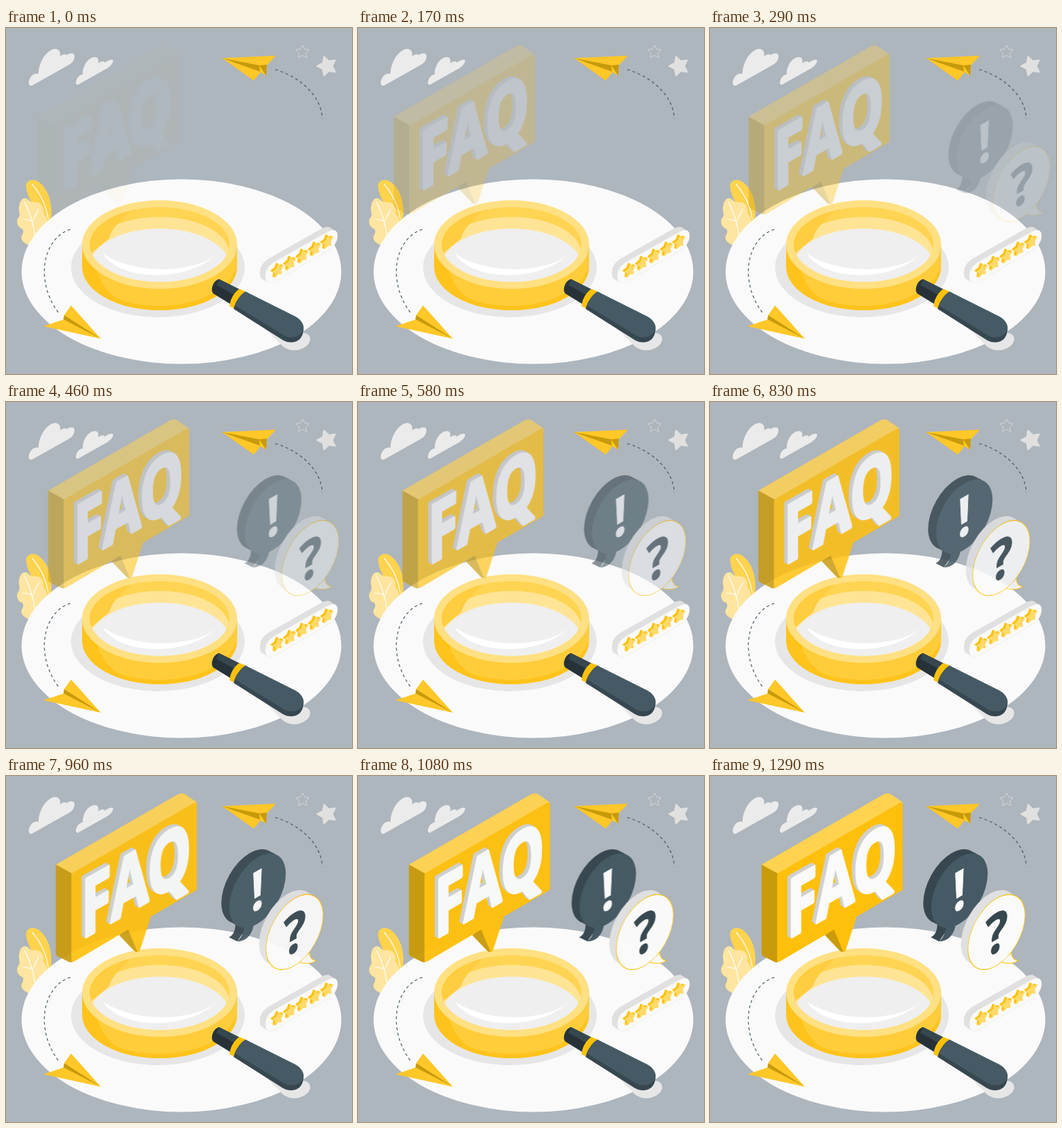
An HTML page that plays this animation: 500x500 px, repeating every 1330 ms.

```html
<!DOCTYPE html>
<html lang="en">
<head>
<meta charset="utf-8">
<title>FAQ</title>
<style>
  html, body { margin: 0; width: 100%; height: 100%; overflow: hidden; background: #adb5bd; }
  svg { display: block; width: 100%; height: 100%; }
  text { font-family: "Open Sans", "Noto Sans", sans-serif; font-weight: 700; stroke-linejoin: round; }
  .dash { fill: none; stroke: #455a64; stroke-width: 1.2; stroke-dasharray: 4 4; }
  .vein { fill: none; stroke: #fff; stroke-width: 1.2; stroke-linecap: round; }
</style>
</head>
<body>
<svg viewBox="0 0 500 500">
  <defs>
    <clipPath id="hole"><ellipse cx="222" cy="313" rx="101" ry="54"/></clipPath>
    <path id="pill" d="M375 358C375 349 380 343 388 338L462 296C472 290 479 291 479 300C479 309 473 317 466 321L391 365C381 371 374 369 375 358Z"/>
    <circle id="round" r="48" transform="matrix(.85 -.5 0 1 0 0)"/>
    <text id="word" transform="matrix(.68 -.39 0 1 116 233.5)" font-size="116" stroke-width="5" x="-7 56 134">FAQ</text>
    <g id="ask">
      <use href="#round" x="414" y="225.5"/>
      <path d="M435 256C436 263 439 266 444 267C438 271 430 271 422 269Z"/>
    </g>
  </defs>

  <g fill="#ebebeb">
    <path d="M38 83C33 85 31 79 35 72C38 67 42 65 47 66C47 54 54 37 67 31C75 28 80 34 78 41C82 38 86 37 88 39C92 36 99 35 99 41C99 49 92 53 86 56Z"/>
    <path d="M104 82C99 82 101 75 104 71C107 68 109 67 111 67C110 58 116 46 124 43C132 40 135 45 133 51C137 48 141 47 143 50C148 46 155 44 155 48C153 54 147 58 143 60Z"/>
  </g>
  <g id="sky"></g>

  <path fill="#ffc727" d="M312 43.5L390 40L377 54L376 69L368 64L358 76Z"/>
  <path fill="#c79a0a" d="M312 43.5L366 54L367 63ZM366 54L377 53L376 69Z"/>
  <path class="dash" d="M389 60C424 70 456 98 457 131"/>

  <path fill="#ffd34d" d="M29 228C30 219 40 217 48 223C62 234 68 255 65 278L58 282C50 270 30 250 29 228Z"/>
  <path class="vein" d="M38 226C50 240 58 256 61 276"/>
  <path fill="#ffe5a0" d="M19 258C20 246 28 243 33 249C38 254 40 250 46 252C54 255 55 262 54 268C58 272 60 278 62 290L40 318C30 312 22 310 22 302C24 297 27 293 23 290C16 288 14 278 18 274C22 270 17 262 19 258Z"/>
  <path class="vein" d="M27 252C34 266 40 282 42 302M25 276L40 279M47 262L40 276"/>

  <ellipse cx="253.5" cy="352" rx="231" ry="133.5" fill="#fafafa"/>
  <path class="dash" d="M93 291C54 303 40 365 77 413"/>
  <path fill="#ffc727" d="M94 401L137 449L54 431L87 420L84 415Z"/>
  <path fill="#c79a0a" d="M84 415L137 449L83 421Z"/>

  <g fill="#e6e6e6">
    <ellipse cx="219.5" cy="346" rx="125.5" ry="72"/>
    <path d="M340 400L400 460C410 468 425 468 436 458C444 448 438 440 426 440Z"/>
  </g>
  <path fill="#ffc31b" d="M110 313V345A112 63 0 0 0 334 345V313Z"/>
  <path fill="#ffcd3a" d="M130 340C134 366 146 382 162 392C210 410 310 406 334 345V313Z"/>
  <ellipse cx="222" cy="313" rx="112" ry="64" fill="#ffe082"/>
  <g clip-path="url(#hole)">
    <rect x="120" y="255" width="204" height="115" fill="#ffd452"/>
    <ellipse cx="222" cy="327" rx="101" ry="54" fill="#ffe495"/>
    <path fill="#ffcd40" d="M118 255H185C175 275 155 282 149 304L118 330Z"/>
    <ellipse cx="222" cy="344" rx="101" ry="54" fill="#efefef"/>
    <path fill="#fff" d="M140 326C165 368 275 370 314 316C290 355 190 360 140 326Z"/>
  </g>
  <path fill="#263238" d="M308 363L340 379L326 400L300 384C294 379 300 364 308 363Z"/>
  <path fill="#37474f" d="M308 363L340 379L334 388L304 371Z"/>
  <path fill="#ffc107" d="M337 377L347 381C339 387 333 396 331 406L323 402C324 392 329 383 337 377Z"/>
  <path fill="#37474f" d="M346 381L418 417C432 424 433 441 424 450C417 456 407 455 400 451L329 406C331 396 338 386 346 381Z"/>
  <path fill="#455a64" d="M346 381L418 417C429 423 432 432 429 438C424 447 412 449 403 445L331 401C334 392 340 385 346 381Z"/>

  <g fill="#e0e0e0">
    <use href="#pill" x="-8" y="-5"/><use href="#pill" x="-5" y="-3"/><use href="#pill" x="-2" y="-1"/>
  </g>
  <use href="#pill" fill="#fafafa" stroke="#ebebeb" stroke-width=".8"/>
  <g id="rating"></g>

  <g id="talk">
    <g fill="#37474f">
      <use href="#round" x="349" y="159.5"/><use href="#round" x="355" y="162.5"/>
      <path d="M328 205C330 222 326 230 319 233L331 239L350 212Z"/>
    </g>
    <g fill="#455a64">
      <use href="#round" x="360.5" y="165.5"/>
      <path d="M341 210C342 224 338 233 331 239C342 239 352 232 355 215Z"/>
    </g>
    <text transform="matrix(.866 -.5 0 1 360.5 165)" y="28" font-size="78" text-anchor="middle" fill="#fafafa" stroke="#fafafa">!</text>
    <g fill="#e0e0e0">
      <use href="#round" x="403.5" y="218.5"/><use href="#round" x="409" y="222"/>
    </g>
    <use href="#ask" fill="none" stroke="#ffc107" stroke-width="2"/>
    <use href="#ask" fill="#fafafa"/>
    <text transform="matrix(.866 -.5 0 1 414.5 226)" y="28" font-size="78" text-anchor="middle" fill="#37474f" stroke="#37474f">?</text>
  </g>

  <g id="board">
    <path fill="#ffd250" d="M74.5 128L250 27Q257 23 262 27L278.5 38L97 142Z"/>
    <path fill="#c99a0a" d="M74.5 128L98 141V269Q95 270 92 268L78 261Q74.5 259 74.5 256Z"/>
    <path fill="#c99a0a" d="M166 230L180 220L193 254Q190 255 187 252Z"/>
    <path fill="#ffc00c" d="M97 143Q97 141 99 140L274 39Q278.5 37 278.5 41V163Q278.5 165 276 166L212 203L196 252Q194 256 192 253L179 222L101 268Q97 270 97 266Z"/>
    <g id="depth" fill="#d0d0d0" stroke="#d0d0d0"></g>
    <use href="#word" fill="#fafafa" stroke="#fafafa"/>
  </g>
</svg>
<script>
  const NS = 'http://www.w3.org/2000/svg';
  const $ = id => document.getElementById(id);

  function add(parent, tag, attrs) {
    const el = document.createElementNS(NS, tag);
    for (const k in attrs) el.setAttribute(k, attrs[k]);
    return parent.appendChild(el);
  }

  function star(parent, r, transform, attrs) {
    const pts = Array.from({ length: 10 }, (_, i) => {
      const a = Math.PI * (i / 5 - .5), d = i % 2 ? r * .52 : r;
      return (d * Math.cos(a)).toFixed(2) + ',' + (d * Math.sin(a)).toFixed(2);
    });
    add(parent, 'polygon', { points: pts.join(' '), transform, 'stroke-linejoin': 'round', ...attrs });
  }

  star($('sky'), 10, 'translate(428.5 34.5)', { fill: 'none', stroke: '#e0e0e0', 'stroke-width': .8 });
  star($('sky'), 14.5, 'translate(464 55) rotate(-18)', { fill: '#e0e0e0', stroke: '#e0e0e0', 'stroke-width': 2 });

  for (let i = 0; i < 5; i++) {
    const x = 393.5 + 17.9 * i, y = 350.5 - 10.3 * i;
    for (const [d, fill] of [[3, '#ffc107'], [1.5, '#ffc107'], [0, '#ffda6a']])
      star($('rating'), 9, `matrix(.866 -.5 0 1 ${x - d} ${y - d * .5})`, { fill, stroke: fill, 'stroke-width': 1.4 });
  }

  for (let i = 5; i > 0; i--) add($('depth'), 'use', { href: '#word', x: -i, y: -i * .58 });

  // cubic-bezier(0, 0, .58, 1)
  function easeOut(x) {
    x = Math.min(1, Math.max(0, x));
    let lo = 0, hi = 1;
    for (let i = 0; i < 24; i++) {
      const s = (lo + hi) / 2;
      if (1.74 * s * s - .74 * s ** 3 < x) lo = s; else hi = s;
    }
    return lo * lo * (3 - 2 * lo);
  }

  // 24 steps per second, each start rounded to 10 ms
  const LOOP = 1330, STEPS = 32;

  function slideIn(el, from, progress) {
    const frames = [];
    for (let i = 0; i <= STEPS; i++) {
      const p = easeOut(progress(Math.min(i, STEPS - 1)));
      frames.push({
        offset: Math.min(1, Math.round(i * 12.5 / 3) * 10 / LOOP),
        opacity: p,
        transform: `translateX(${from * (1 - p)}px)`,
        easing: 'steps(1, end)'
      });
    }
    el.animate(frames, { duration: LOOP, iterations: Infinity });
  }

  slideIn($('board'), -30, i => (i + .7) / 31);
  slideIn($('talk'), 45, i => (i - 4.1) / 23.8);
</script>
</body>
</html>
```
